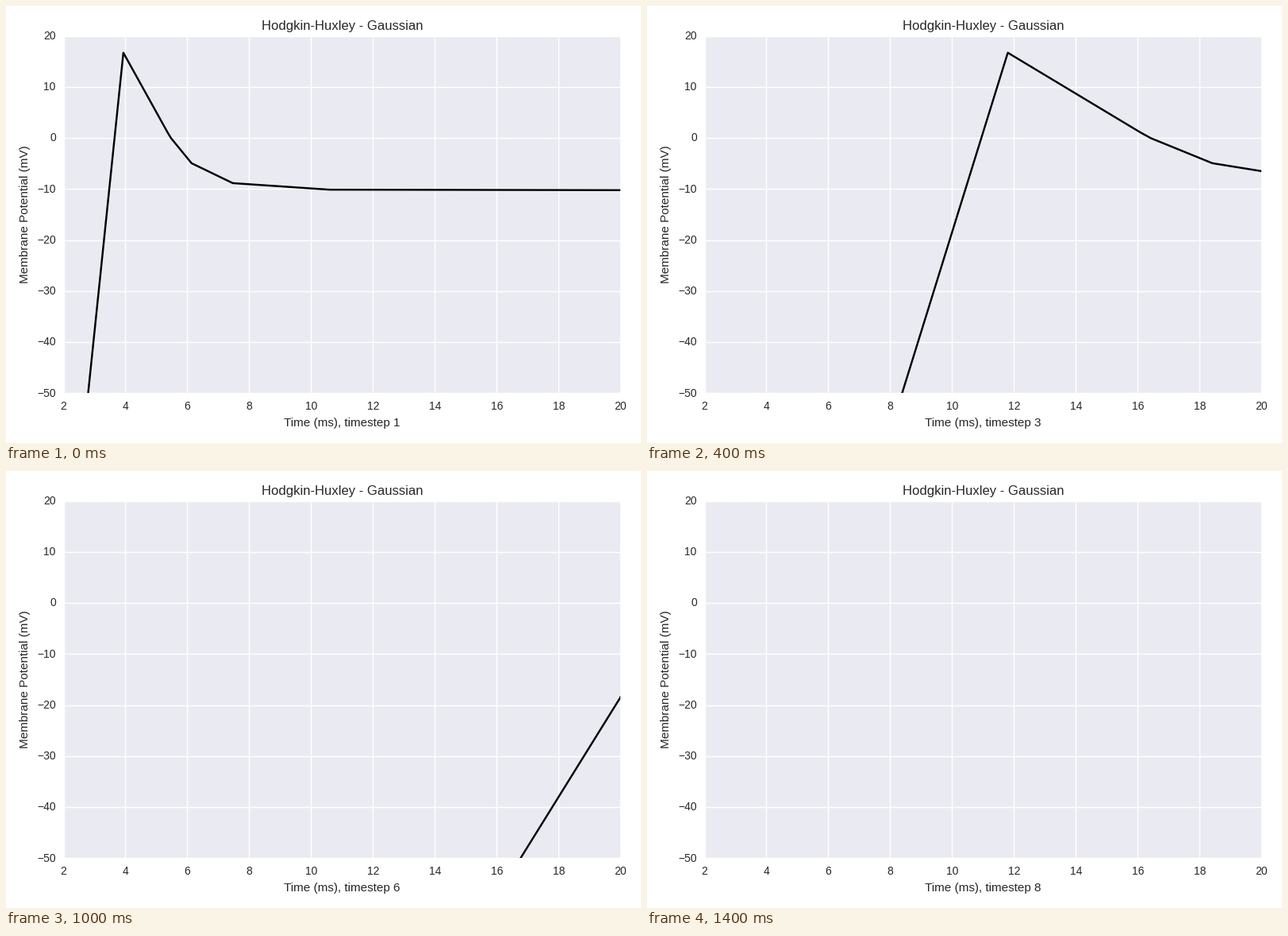
Animation of 800 by 550 pixels, one loop 1600 ms. Source, as a matplotlib script:

```python
import numpy as np
import matplotlib.pyplot as plt
from matplotlib.animation import FuncAnimation

W, H, DPI = 800, 550, 100
LEFT, RIGHT, TOP, BOTTOM = 72.5, 774.3, 37.6, 487.3
STEPS, INTERVAL = 8, 200
INK = "#262626"

plt.rcParams.update({"font.family": "Liberation Sans", "text.color": INK})

# Membrane response; each timestep stretches its time axis.
TIME = np.array([2.6, 3.933, 5.36, 5.475, 6.137, 7.468, 10.6, 20])
VOLTAGE = np.array([-61.4, 16.7, 1.1, -0.05, -4.95, -8.85, -10.13, -10.22])

fig = plt.figure(figsize=(W / DPI, H / DPI), dpi=DPI, facecolor="white")
ax = fig.add_axes([LEFT / W, 1 - BOTTOM / H, (RIGHT - LEFT) / W, (BOTTOM - TOP) / H])
ax.set(xlim=(2, 20), ylim=(-50, 20), facecolor="#eaeaf2", axisbelow=True,
       xticks=range(2, 21, 2), yticks=range(-50, 21, 10))
ax.grid(color="white", lw=1, ls="-")
ax.tick_params(length=0, labelbottom=False, labelleft=False)
ax.spines[:].set_visible(False)


def label(x, y, text, size, ha="center", **kwargs):
    """Place text with its baseline at a pixel position from the top left."""
    return fig.text(x / W, 1 - y / H, text, size=size, ha=ha, va="baseline", **kwargs)


for t in range(2, 21, 2):
    label(LEFT + (t - 2) / 18 * (RIGHT - LEFT), 508, str(t), 10)
for v in range(-50, 21, 10):
    y = TOP + (20 - v) / 70 * (BOTTOM - TOP)
    label(62.8, y + 4.3, str(v).replace("-", "\u2212"), 10, ha="right")

CENTER = (LEFT + RIGHT) / 2
label(CENTER, 30, "Hodgkin-Huxley - Gaussian", 12)
label(28, (TOP + BOTTOM) / 2, "Membrane Potential (mV)", 11, ha="right",
      rotation=90, rotation_mode="anchor").set_ha("center")
x_label = label(CENTER, 529, "", 11)
line, = ax.plot([], [], color="black", lw=1.75, solid_capstyle="butt",
                solid_joinstyle="round")


def update(frame):
    step = frame + 1
    line.set_data(TIME * step, VOLTAGE)
    x_label.set_text(f"Time (ms), timestep {step}")
    return line, x_label


anim = FuncAnimation(fig, update, frames=STEPS, interval=INTERVAL,
                     repeat=True, repeat_delay=0)
plt.show()
```
